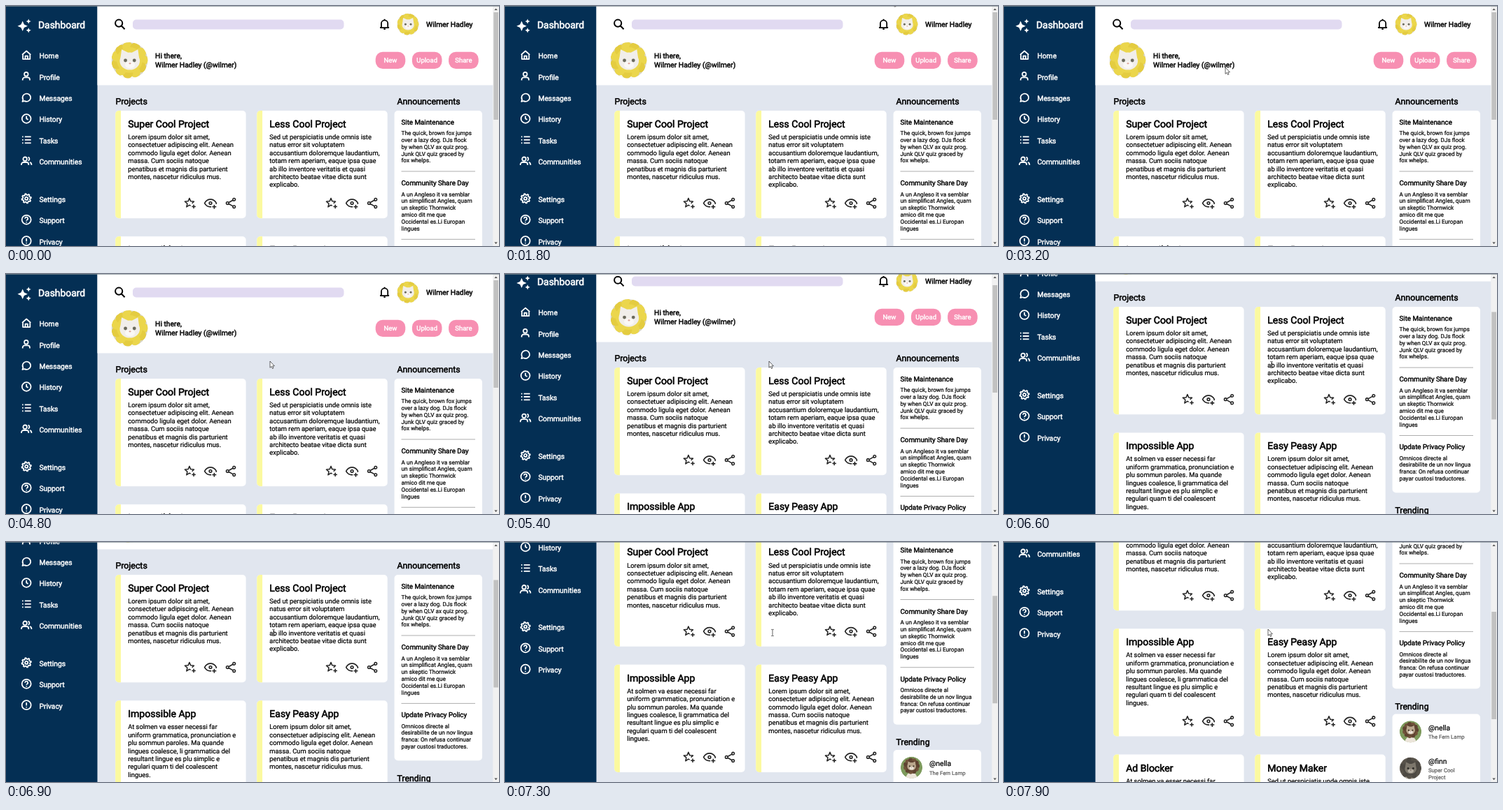
An HTML page for the animation above (8000 ms loop, 704 px wide and 344 px high).

```html
<!DOCTYPE html>
<html lang="en">
<head>
<meta charset="utf-8">
<title>Dashboard</title>
<style>
html, body { margin: 0; width: 100%; height: 100%; overflow: hidden; background: #e1e6ef; }
svg { display: block; width: 704px; height: 344px; }
text {
  font-family: Roboto, sans-serif; fill: currentColor; stroke: currentColor; stroke-width: .024em;
  stroke-linejoin: round; text-rendering: geometricPrecision; white-space: pre;
}
.b { stroke-width: .044em; }
</style>
</head>
<body>
<svg id="stage" viewBox="0 0 704 344" xmlns="http://www.w3.org/2000/svg"></svg>
<script>
const LOOP = 8000, STEP = 51.5;
const NAVY = '#042f54', PINK = '#f78fb2', YELLOW = '#fbf99f', BACK = '#e1e6ef';

// ---- drawing helpers ----
const rect = (x, y, w, h, fill, r = 0) =>
  `<rect x="${x}" y="${y}" width="${w}" height="${h}" rx="${r}" fill="${fill}"/>`;
const dot = (x, y, r, fill) => `<circle cx="${x}" cy="${y}" r="${r}" fill="${fill}"/>`;
const oval = (x, y, rx, ry, fill) => `<ellipse cx="${x}" cy="${y}" rx="${rx}" ry="${ry}" fill="${fill}"/>`;
const text = (x, y, str, size, color = '#000', bold = false, anchor = 'start') =>
  `<text x="${x}" y="${y}" font-size="${size}" color="${color}" text-anchor="${anchor}"${bold ? ' class="b"' : ''}>${str}</text>`;
const lines = (x, y, rows, size, pitch, color) =>
  rows.map((row, i) => text(x, y + i * pitch, row, size, color)).join('');
const ring = (r, x = 12, y = 12) => `M${x - r} ${y}a${r} ${r} 0 1 0 ${2 * r} 0a${r} ${r} 0 1 0 ${-2 * r} 0`;

function gear() {
  let d = '';
  for (let i = 0; i < 32; i++) {
    const a = (i - 1.5) / 32 * 2 * Math.PI, r = i % 4 < 2 ? 9.8 : 7.4;
    d += `${i ? 'L' : 'M'}${(12 + r * Math.sin(a)).toFixed(2)} ${(12 - r * Math.cos(a)).toFixed(2)}`;
  }
  return d + 'Z' + ring(3);
}

// ---- icons in a 24 unit box ----
const USER = 'M4 20.5v-1.5a4.5 4.5 0 0 1 4.5-4.5h6a4.5 4.5 0 0 1 4.5 4.5v1.5';
const PLUS = 'M19 15v7.5M15.2 18.7h7.6';
const ICONS = {
  home: 'M4.5 10.3V20.5H19.5V10.3M3 11.5 12 3.5 21 11.5M9.5 20.5V14H14.5V20.5',
  user: ring(4, 11.5, 7.5) + USER,
  chat: 'M3.6 20.6 5 16.4A8.5 8.2 0 1 1 8.2 19.4Z',
  clock: ring(9.3) + 'M12 6.5V12L15.6 14',
  list: 'M8.5 5.5H21.5M8.5 12H21.5M8.5 18.5H21.5M3 5.5H5.4M3 12H5.4M3 18.5H5.4',
  users: ring(4, 9, 7.5) + 'M1.5 20.5V19A4.5 4.5 0 0 1 6 14.5H12A4.5 4.5 0 0 1 16.5 19V20.5' +
    'M15.5 3.7A4 4 0 0 1 15.5 11.3M22.5 20.5V19A4.4 4.4 0 0 0 19 14.7',
  gear: gear(),
  help: ring(9.5) + 'M9 9.7A3 3 0 1 1 13.5 12.2Q12 13 12 14.3M12 16.4V18',
  alert: ring(9.5) + 'M12 6.5V13M12 15.6V17.6',
  search: ring(6.7, 10, 10) + 'M15 15 21 21.3',
  bell: 'M6 17.5V11A6 6 0 0 1 18 11V17.5L19.5 18.8H4.5ZM12 3V5M10.3 21.6H13.7',
  star: 'M13 17.2 10.5 15.7 4.9 19.4 6.4 13 1.5 8.8 8 8.2 10.5 2.2 13 8.2 19.5 8.8 15.6 12.3' + PLUS,
  eye: 'M13.5 18.8Q5 19.6 1 12Q5 4.8 12 4.8T23 12Q22.7 12.8 22 13.6' + ring(2.4) + PLUS,
  share: ring(2.5, 18.5, 4.8) + ring(2.5, 5.5, 12) + ring(2.5, 18.5, 19.2) +
    'M7.8 10.8 16.2 6M7.8 13.2 16.2 18'
};
const icon = (name, x, y, size, color, width) =>
  `<path transform="translate(${x - size / 2} ${y - size / 2}) scale(${size / 24})" d="${ICONS[name]}" ` +
  `fill="none" stroke="${color}" stroke-width="${width}" stroke-linejoin="round"/>`;

const sparkle = (x, y, r) => {
  const k = r * .31;
  return `<path fill="#fff" d="M${x} ${y - r}L${x + k} ${y - k} ${x + r} ${y} ${x + k} ${y + k} ${x} ${y + r} ` +
    `${x - k} ${y + k} ${x - r} ${y} ${x - k} ${y - k}Z"/>`;
};

// ---- round pet pictures, drawn in a unit circle ----
function pet(x, y, r, look) {
  let head = '';
  for (let i = 0; i < 11; i++) {
    const a = i / 11 * 2 * Math.PI;
    head += dot(.7 * Math.cos(a), .7 * Math.sin(a), .28, look.mane[i % 2]);
  }
  head += dot(0, 0, .68, look.mane[0]);
  head += `<path d="M-.5 0-.42-.56-.08-.4H.12L.44-.56.52 0Z" fill="${look.face}"/>`;
  head += oval(.01, .06, .53, .46, look.face) + oval(.02, .26, .26, .18, look.muzzle);
  head += dot(-.22, .02, .09, look.eye) + dot(.25, .02, .09, look.eye) + oval(.02, .18, .06, .04, look.nose);
  return `<g transform="translate(${x} ${y}) scale(${r})" clip-path="url(#disc)">${dot(0, 0, 1, look.back)}` +
    `${oval(0, .95, .5, .5, look.muzzle)}<g transform="translate(0 ${look.lift}) scale(${look.size})">${head}</g></g>`;
}
const FLOWER = { back: '#d9d5c4', mane: ['#ebd64c', '#e4cc40'], face: '#f1eeea', muzzle: '#faf8f5',
  eye: '#6b6a5c', nose: '#dba49c', size: 1.04, lift: -.02 };
const LION = { back: '#7d9a5c', mane: ['#5f4331', '#71523a'], face: '#b9a68c', muzzle: '#ece5da',
  eye: '#3a3024', nose: '#a8776a', size: .76, lift: -.14 };
const TABBY = { back: '#6d675e', mane: ['#4d4943', '#57524a'], face: '#7d776c', muzzle: '#b5aea2',
  eye: '#2c2a26', nose: '#6b5650', size: 1, lift: 0 };

// ---- page content ----
const LOREM = ['Lorem ipsum dolor sit amet,', 'consectetuer adipiscing elit. Aenean', 'commodo ligula eget dolor. Aenean',
  'massa. Cum sociis natoque', 'penatibus et magnis dis parturient', 'montes, nascetur ridiculus mus.'];
const SED = ['Sed ut perspiciatis unde omnis iste', 'natus error sit voluptatem', 'accusantium doloremque laudantium,',
  'totam rem aperiam, eaque ipsa quae', 'ab illo inventore veritatis et quasi', 'architecto beatae vitae dicta sunt', 'explicabo.'];
const SOLMEN = ['At solmen va esser necessi far', 'uniform grammatica, pronunciation e', 'plu sommun paroles. Ma quande',
  'lingues coalesce, li grammatica del', 'resultant lingue es plu simplic e', 'regulari quam ti del coalescent', 'lingues.'];
const CARDS = [['Super Cool Project', LOREM], ['Less Cool Project', SED], ['Impossible App', SOLMEN],
  ['Easy Peasy App', LOREM], ['Ad Blocker', SOLMEN], ['Money Maker', SED]];
const NEWS = [
  [169.8, 'Site Maintenance', ['The quick, brown fox jumps', 'over a lazy dog. DJs flock', 'by when QLV ax quiz prog.',
    'Junk QLV quiz graced by', 'fox whelps.']],
  [257.3, 'Community Share Day', ['A un Angleso it va semblar', 'un simplificat Angles, quam', 'un skeptic Thornwick',
    'amico dit me que', 'Occidental es.Li Europan', 'lingues']],
  [354.2, 'Update Privacy Policy', ['Omnicos directe al', 'desirabilite de un nov lingua', 'franca: On refusa continuar',
    'payar custosi traductores.']]
];
const MENU = [['home', 'Home'], ['user', 'Profile'], ['chat', 'Messages'], ['clock', 'History'], ['list', 'Tasks'],
  ['users', 'Communities'], ['gear', 'Settings'], ['help', 'Support'], ['alert', 'Privacy']];

function sidebar() {
  let out = sparkle(23.7, 28.8, 7.2) + sparkle(32.2, 22, 3.6) + sparkle(32.2, 34.8, 3.6);
  out += text(46, 32.2, 'Dashboard', 13.9, '#fff', true);
  MENU.forEach(([name, label], i) => {
    const y = 75.1 + 30.4 * i + (i > 5 ? 23.2 : 0);
    out += icon(name, 29.2, y - 4.8, 16.4, '#fff', 2.6) + text(47.4, y, label, 10.3, '#fff', true);
  });
  return out;
}

function header() {
  let out = rect(130.5, -1, 565, 114.5, '#fff');
  out += icon('search', 162.7, 26.2, 18.2, '#000', 2.6) + rect(181, 19.5, 301.5, 14, '#e1daf1', 5);
  out += icon('bell', 540.6, 25.8, 18.5, '#000', 2.3) + pet(574, 26.3, 15.6, FLOWER);
  out += text(600, 30.2, 'Wilmer Hadley', 10.35, '#000', true);
  out += pet(176.5, 78, 26, FLOWER);
  out += text(213, 75.2, 'Hi there,', 10.35, '#000', true);
  out += text(213, 87.7, 'Wilmer Hadley (@wilmer)', 10.35, '#000', true);
  ['New', 'Upload', 'Share'].forEach((label, i) => {
    const x = 527.7 + 52.2 * i;
    out += rect(x, 65.7, 42.6, 24.2, PINK, 10.3) + text(x + 21.3, 81, label, 9.5, '#fff', true, 'middle');
  });
  return out;
}

function card([title, rows], i) {
  const x = i % 2 ? 358.3 : 156.2, y = 150 + 180.3 * Math.floor(i / 2), w = 186.4, h = 154.2;
  let out = rect(x, y, w, h, '#fff', 5);
  out += `<path fill="${YELLOW}" d="M${x + 7.8} ${y}H${x + 5}a5 5 0 0 0-5 5V${y + h - 5}a5 5 0 0 0 5 5h2.8Z"/>`;
  out += text(x + 18, y + 23.9, title, 14.05, '#000', true) + lines(x + 18, y + 41, rows, 9.4, 11.4, '#000');
  ['star', 'eye', 'share'].forEach((name, k) => {
    out += icon(name, x + 106.8 + 29 * k, y + 132.6, name === 'eye' ? 18.4 : 17.4, '#222', 2.1);
  });
  return out;
}

function aside() {
  let out = text(558.4, 141.2, 'Announcements', 12.4, '#000', true) + rect(554.6, 150, 125.4, 266.3, '#fff', 5);
  for (const [y, title, rows] of NEWS)
    out += text(564.5, y, title, 9.78, '#000', true) + lines(564.5, y + 15.3, rows, 8.25, 9.8, '#000');
  for (const y of [236.6, 333.9]) out += rect(564.5, y, 105.5, .8, '#999');
  out += text(558.4, 445.6, 'Trending', 12.4, '#000', true) + rect(554.6, 452.6, 125.4, 150, '#fff', 5);
  out += pet(580.5, 477.8, 15.6, LION) + text(606, 475.6, '@nella', 10.35);
  out += text(606, 488.2, 'The Fern Lamp', 7.75, '#555');
  out += pet(580.5, 530.2, 15.6, TABBY) + text(606, 524, '@finn', 10.35);
  out += lines(606, 536.3, ['Super Cool', 'Project'], 7.75, 9.2, '#555');
  return out;
}

const ARROW = 'M0 0V9.3L2.1 7.4 3.5 10.5 5 9.8 3.7 6.8H6.4Z';
const BEAM = 'M-1.8-4.6H-.5L0-4.2.5-4.6H1.8M0-4.2V4.2M-1.8 4.6H-.5L0 4.2.5 4.6H1.8';
document.getElementById('stage').innerHTML =
  '<defs><clipPath id="disc"><circle r="1"/></clipPath></defs>' +
  rect(0, 0, 704, 344, BACK) + rect(0, 0, 130.5, 344, NAVY) +
  `<g id="page">${sidebar()}${header()}${text(156.4, 141.2, 'Projects', 12.4, '#000', true)}${CARDS.map(card).join('')}${aside()}</g>` +
  rect(695.3, 0, 8.7, 344, '#f1f1f1') +
  '<path fill="#555" d="M697.4 6 699.6 3.4 701.8 6ZM697.4 338.6 699.6 341.2 701.8 338.6Z"/>' +
  `<g id="thumb">${rect(696.3, 9, 6.7, 154, '#c1c1c1')}</g>` +
  rect(0, 0, 704, .7, '#7f8b91') +
  `<path id="arrow" d="${ARROW}" fill="#fff" stroke="#000" stroke-width=".6"/>` +
  `<path id="beam" d="${BEAM}" transform="translate(382 130)" fill="none" stroke="#222" stroke-width=".7"/>`;

// ---- motion ----
const [page, thumb, arrow, beam] = ['page', 'thumb', 'arrow', 'beam'].map(id => document.getElementById(id));
const WHEEL = [5340, 6440, 7130, 7640];
const PATH = [[2960, 440, 0], [3200, 316, 88], [3400, 330, 94], [3900, 373, 107],
  [4200, 374, 111], [4600, 376, 123], [4800, 377, 125]];
const clamp = v => Math.max(0, Math.min(1, v));
const ease = v => v * v * (3 - 2 * v);

const scrollAt = t => STEP * WHEEL.reduce((sum, start) => sum + ease(clamp((t - start) / 165)), 0);

function pointerAt(t) {
  if (t < PATH[0][0]) return t >= 1750 && t < 2300 ? [553, -9.3] : [-50, -50];
  let i = 1;
  while (i < PATH.length - 1 && t > PATH[i][0]) i++;
  const [t0, x0, y0] = PATH[i - 1], [t1, x1, y1] = PATH[i], k = clamp((t - t0) / (t1 - t0));
  return [x0 + (x1 - x0) * k, y0 + (y1 - y0) * k];
}

function render(t) {
  const y = scrollAt(t), [px, py] = pointerAt(t), overText = t >= 5500 && t < 7400;
  page.setAttribute('transform', `translate(0 ${-y})`);
  thumb.setAttribute('transform', `translate(0 ${y * .4417})`);
  arrow.setAttribute('transform', `translate(${px} ${py})`);
  arrow.setAttribute('visibility', overText ? 'hidden' : 'visible');
  beam.setAttribute('visibility', overText ? 'visible' : 'hidden');
}

const begin = performance.now();
function tick() {
  render((performance.now() - begin) % LOOP);
  requestAnimationFrame(tick);
}
tick();
</script>
</body>
</html>
```
